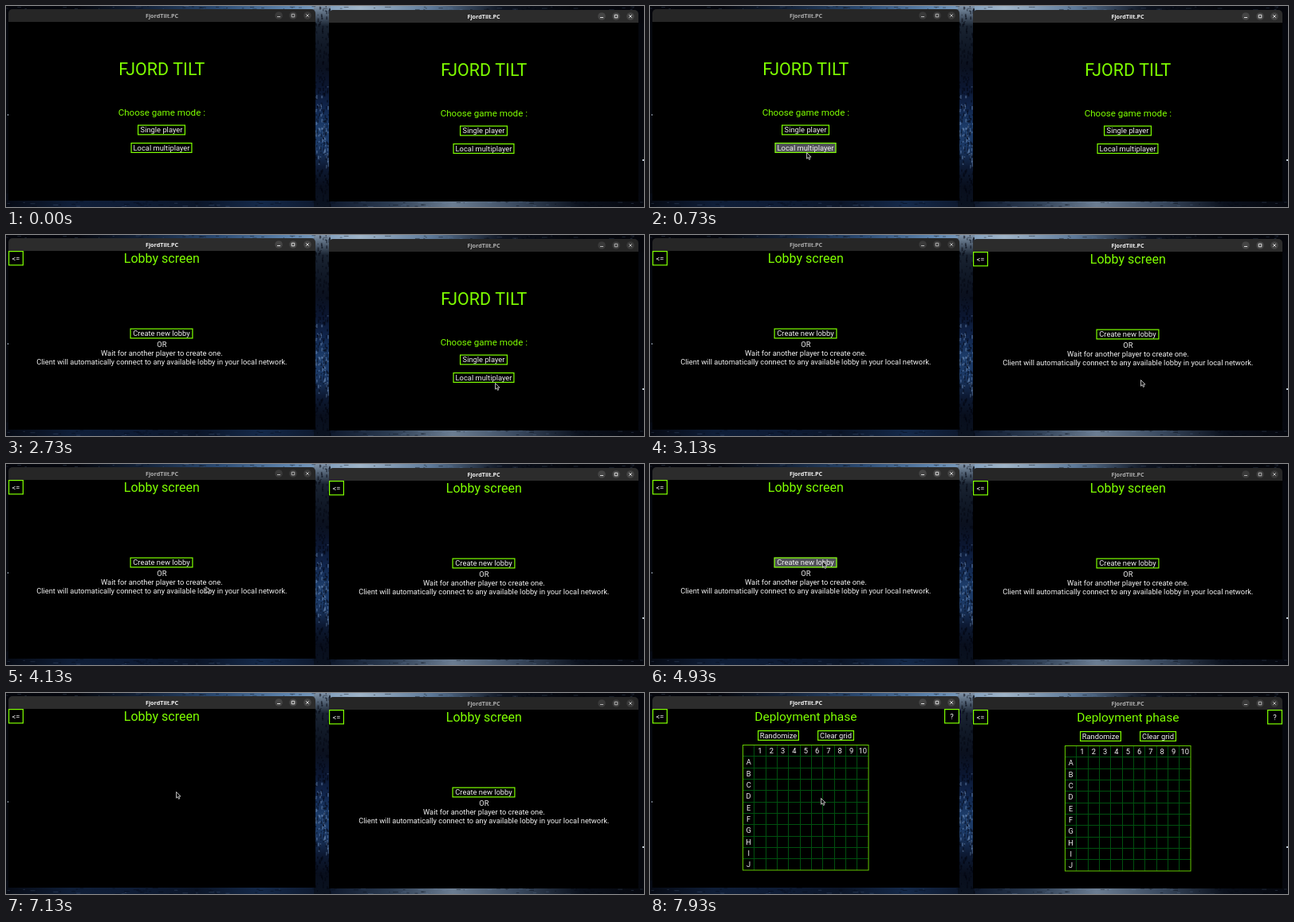
An HTML page with a canvas that plays this animation: 800x253 px, repeating every 8 s.

```html
<!DOCTYPE html>
<html lang="en">
<head>
<meta charset="utf-8">
<title>Two player lobby</title>
<style>
  html, body { margin: 0; width: 100%; height: 100%; overflow: hidden; background: #000; }
  canvas { display: block; width: 100%; height: 100%; }
</style>
</head>
<body>
<canvas id="stage" width="800" height="253"></canvas>
<script>
const LOOP = 8000, TICK = 1000 / 15;
const GREEN = '#7fff00', WHITE = '#f2f2f2';
const GAME_FONT = 'Roboto, sans-serif', TITLE_FONT = '"Noto Sans", sans-serif';
const stage = document.getElementById('stage');
const ctx = stage.getContext('2d');

// shift: offset of the centred content; from: tick at which each screen opens
const windows = [
  { x: 3, y: 4, w: 385, h: 241, shift: 0, lobbyFrom: 19, emptyFrom: 106 },
  { x: 405, y: 5, w: 388, h: 241, shift: 404, lobbyFrom: 46, emptyFrom: Infinity }
];
const DEPLOY_FROM = 110;

// Pointer path: tick, x, y
const path = [
  [2, 131, 230], [11, 196, 184], [13, 196, 184], [15, 200, 181], [24, 200, 181],
  [26, 194, 198], [31, 330, 246], [37, 612, 210], [41, 613, 186], [42, 615, 182],
  [49, 615, 182], [52, 450, 211], [54, 302, 202], [56, 302, 202], [66, 216, 122],
  [88, 216, 122], [90, 216, 147], [92, 216, 147], [95, 217.5, 127], [97, 217.5, 127],
  [98, 210, 126], [100, 213, 124], [116, 213, 124], [119, 214, 132], [120, 214, 132]
];

function pointerAt(tick) {
  if (tick < path[0][0]) return null;
  const i = Math.max(1, path.findIndex(p => p[0] >= tick));
  const [t0, x0, y0] = path[i - 1], [t1, x1, y1] = path[i];
  const k = (tick - t0) / (t1 - t0);
  return { x: x0 + (x1 - x0) * k, y: y0 + (y1 - y0) * k };
}

function gradient(g, x1, y1, colors) {
  const fill = g.createLinearGradient(0, 0, x1, y1);
  colors.forEach((c, i) => fill.addColorStop(i / (colors.length - 1), c));
  return fill;
}

// Soft view of a planet in space, seen only around the windows
function makeBackdrop() {
  const canvas = document.createElement('canvas');
  canvas.width = 800;
  canvas.height = 253;
  const g = canvas.getContext('2d');
  const strip = (x, y, w, h, fill) => { g.fillStyle = fill; g.fillRect(x, y, w, h); };
  strip(0, 0, 800, 253, '#05070e');
  strip(0, 0, 800, 22, gradient(g, 800, 0,
    ['#05060c', '#05070e', '#14243c', '#2b4b74', '#5f86b0', '#9fb4c8', '#5c7898', '#0d1320', '#05070d', '#05060c']));
  strip(0, 236, 800, 17, gradient(g, 800, 0,
    ['#060a14', '#0f1e38', '#0e1c36', '#0b1528', '#14294a', '#0c162a', '#2a3a50', '#6b7d92', '#3a4a60', '#0a101c', '#05070e']));
  strip(386, 0, 21, 253, gradient(g, 0, 253,
    ['#8094aa', '#1a2432', '#101826', '#0a101e', '#0b1630', '#10244a', '#1c3b68', '#1b3864', '#0d1a34', '#080e1c', '#0a1220']));
  let seed = 7;
  const random = () => (seed = seed * 16807 % 2147483647) / 2147483647;
  for (let i = 0; i < 300; i++) {
    g.fillStyle = i % 4 ? 'rgba(2,5,14,.5)' : 'rgba(140,175,220,.35)';
    const y = i % 4 ? random() * 253 : 158 + (random() + random() - 1) * 60;
    g.fillRect(386 + random() * 20, y, 1 + random(), 1 + random() * 4);
  }
  for (let i = 0; i < 200; i++) {
    g.fillStyle = i % 3 ? 'rgba(2,5,14,.4)' : 'rgba(120,150,190,.2)';
    g.fillRect(random() * 800, i % 2 ? random() * 5 : 245 + random() * 8, 1 + random() * 6, 1);
  }
  strip(2, 136, 1, 2, '#9aa8b8');
  strip(798, 193, 2, 2, '#c4d0dc');
  return canvas;
}
const backdrop = makeBackdrop();

// cy is the middle of the capital letters
function text(str, cx, cy, size, color = WHITE, font = GAME_FONT, weight = 400) {
  ctx.font = `${weight} ${size}px ${font}`;
  ctx.fillStyle = color;
  ctx.fillText(str, cx, cy + size * 0.355);
}

function button(label, x, y, w, h, pointer) {
  const hovered = pointer && pointer.x >= x && pointer.x < x + w
    && pointer.y >= y && pointer.y < y + h;
  ctx.fillStyle = hovered ? '#505058' : '#000';
  ctx.fillRect(x, y, w, h);
  ctx.strokeStyle = GREEN;
  ctx.lineWidth = 1.2;
  ctx.strokeRect(x + 0.6, y + 0.6, w - 1.2, h - 1.2);
  text(label, x + w / 2, y + h / 2, 9.35);
}

function drawFrame(win, focused) {
  const { x, y, w, h } = win;
  ctx.fillStyle = focused ? '#2c2c2c' : '#262626';
  ctx.beginPath();
  ctx.roundRect(x, y, w, h, [5, 5, 0, 0]);
  ctx.fill();
  ctx.fillStyle = '#000';
  ctx.fillRect(x, y + 16, w, h - 16);
  text('FjordTilt.PC', x + w / 2, y + 8, 7.2, focused ? '#f4f4f4' : '#b0b0b0', TITLE_FONT, 600);

  const right = x + w, cy = y + 8;
  for (const dx of [46, 28, 10]) {
    ctx.fillStyle = focused ? '#454545' : '#3a3a3a';
    ctx.beginPath();
    ctx.arc(right - dx, cy, 4.8, 0, Math.PI * 2);
    ctx.fill();
  }
  ctx.strokeStyle = focused ? '#f0f0f0' : '#c4c4c4';
  ctx.lineWidth = 0.9;
  ctx.beginPath();
  ctx.moveTo(right - 48, cy + 1.5);
  ctx.lineTo(right - 44, cy + 1.5);
  ctx.rect(right - 29.8, cy - 1.8, 3.6, 3.6);
  ctx.moveTo(right - 11.7, cy - 1.7);
  ctx.lineTo(right - 8.3, cy + 1.7);
  ctx.moveTo(right - 8.3, cy - 1.7);
  ctx.lineTo(right - 11.7, cy + 1.7);
  ctx.stroke();
}

function drawMenu(dx, dy, pointer) {
  const cx = 195.3 + dx;
  text('FJORD TILT', cx, 79.3 + dy, 21.4, GREEN);
  text('Choose game mode :', cx, 133.5 + dy, 11.6, GREEN);
  button('Single player', 165 + dx, 149.5 + dy, 60, 13, pointer);
  button('Local multiplayer', 156.5 + dx, 172 + dy, 77, 13, pointer);
}

function drawLobby(dx, dy, pointer, empty) {
  const cx = 195.3 + dx;
  text('Lobby screen', cx, 29.5 + dy, 16, GREEN);
  if (empty) return;
  button('Create new lobby', 155.5 + dx, 117.5 + dy, 79, 13, pointer);
  text('OR', cx, 138 + dy, 9.3);
  text('Wait for another player to create one.', cx, 149 + dy, 9.3);
  text('Client will automatically connect to any available lobby in your local network.', cx, 160 + dy, 9.3);
}

function drawDeployment(dx, dy, pointer) {
  text('Deployment phase', 195.3 + dx, 29.5 + dy, 15.5, GREEN);
  button('Randomize', 135 + dx, 47 + dy, 52, 13, pointer);
  button('Clear grid', 210 + dx, 47 + dy, 46, 13, pointer);

  const left = 116.5 + dx, top = 65.5 + dy, size = 157.5, cell = size / 11;
  ctx.lineWidth = 1;
  ctx.strokeStyle = '#00500f';
  ctx.beginPath();
  for (let i = 1; i < 11; i++) {
    const x = Math.floor(left + i * cell) + 0.5, y = Math.floor(top + i * cell) + 0.5;
    ctx.moveTo(x, top);
    ctx.lineTo(x, top + size);
    ctx.moveTo(left, y);
    ctx.lineTo(left + size, y);
    text(i, left + (i + 0.5) * cell, top + cell / 2, 9.3);
    text('ABCDEFGHIJ'[i - 1], left + cell / 2, top + (i + 0.5) * cell, 9.3);
  }
  ctx.stroke();
  ctx.strokeStyle = '#62c800';
  ctx.strokeRect(left, top, size, size);
}

function drawWindow(win, tick, focused, pointer) {
  const { x, y, w, shift } = win, dy = y - 4;
  drawFrame(win, focused);
  if (tick < win.lobbyFrom) return drawMenu(shift, dy, pointer);
  button('<=', x, y + 16, 19, 18.5, pointer);
  if (tick < DEPLOY_FROM) return drawLobby(shift, dy, pointer, tick >= win.emptyFrom);
  button('?', x + w - 19, y + 16, 19, 18.5, pointer);
  drawDeployment(shift, dy, pointer);
}

const arrow = new Path2D('M.5 .5V8.2L2.2 6.6 3.5 9.4 4.8 8.8 3.6 6.1H6Z');

function drawPointer({ x, y }) {
  ctx.save();
  ctx.translate(x, y);
  ctx.fillStyle = '#111';
  ctx.fill(arrow);
  ctx.strokeStyle = '#ddd';
  ctx.lineWidth = 0.8;
  ctx.stroke(arrow);
  ctx.restore();
}

function draw(now) {
  const tick = Math.floor((now % LOOP + 4) / TICK) % 120;
  const pointer = pointerAt(tick);
  const active = tick >= 18 && tick < 45 || tick >= 71 ? 0 : 1;
  ctx.textAlign = 'center';
  ctx.drawImage(backdrop, 0, 0);
  windows.forEach((win, i) => drawWindow(win, tick, i === active, pointer));
  if (pointer) drawPointer(pointer);
}

const start = performance.now();
function loop() {
  draw(performance.now() - start);
  requestAnimationFrame(loop);
}
loop();
</script>
</body>
</html>
```
